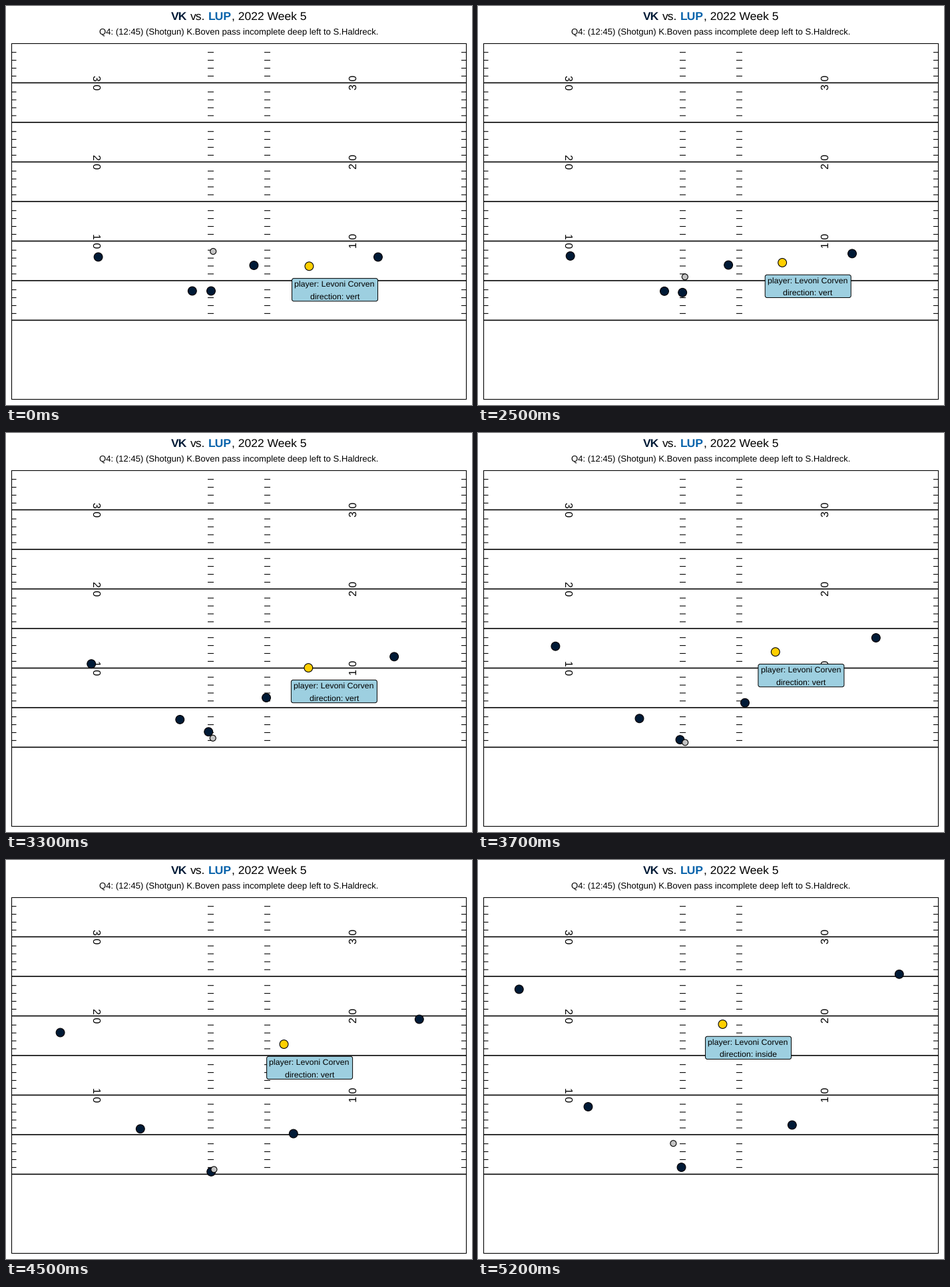
A matplotlib script that plays this animation: 700 px wide and 600 px high, repeating every 7.3 s.

```python
import numpy as np
import matplotlib.pyplot as plt
from matplotlib.animation import FuncAnimation
from matplotlib.patches import Circle, FancyBboxPatch, Rectangle

plt.rcParams.update({"font.family": "Liberation Sans",
                     "text.hinting": "none", "path.snap": False})

W, H, DPI = 700, 600, 100
PX = 72 / DPI
NAVY, BLUE, GOLD = "#001a36", "#0863ab", "#ffcf00"
SKY, GREY = "#9dcfe0", "#c3c3c3"

LEFT, RIGHT, TOP, BOTTOM = 8.5, 691.5, 56.5, 591.5
GOAL, YARD = 472.5, 11.9        # y of the lowest yard line, pixels per yard
FRAMES, INTERVAL = 73, 100
HOLD, STEPS = 20, 32            # opening pause and number of moves
BEAT = 8                        # steps between the points of a run
TURN = 27                       # step at which the route breaks inside

# One point per beat; the last lies one step past the final pose.
RUNS = [
    [(138.6, 377.4), (136, 367.3), (116.4, 320.7), (81.6, 259.5), (59, 185)],
    [(558.9, 377.5), (570, 358.5), (597.8, 308), (620.8, 239.5), (634.4, 162)],
    [(372.4, 390), (383.5, 391), (401, 405.7), (431.8, 411.5), (477.7, 396.5)],
    [(279.8, 428.5), (275.5, 429.3), (242.5, 429.3), (201.8, 404.3), (160.3, 366.2)],
    [(308, 428.5), (305.8, 437.3), (303.5, 461.2), (308.2, 468.8), (305.1, 461)],
]
TARGET = [(455.4, 391.3), (457.8, 372.8), (446.8, 329.2), (417.5, 277), (360.1, 242.8)]


def run(points, step):
    """Smooth cubic run that starts from rest."""
    p = np.array(points)
    slope = np.gradient(p, axis=0)
    slope[0] = 0
    t = max(step - 1, 0) / BEAT
    i = min(int(t), len(p) - 2)
    u = t - i
    ease = u * u * (3 - 2 * u)
    return (p[i] + (p[i + 1] - p[i]) * ease
            + u * (1 - u) * ((1 - u) * slope[i] - u * slope[i + 1]))


def ball_at(step):
    """Snap, short drop back, hold, throw."""
    keys = [1, 9, 15, 29, 32]
    return (np.interp(step, keys, [311.2, 310.5, 310.9, 313, 293.4]),
            np.interp(step, keys, [369, 445.7, 465.4, 465.4, 426.2]))


fig = plt.figure(figsize=(W / DPI, H / DPI), dpi=DPI, facecolor="white")
ax = fig.add_axes([0, 0, 1, 1])
ax.set(xlim=(0, W), ylim=(H, 0))
ax.axis("off")


def label(x, y, text, size, **kw):
    kw = {"ha": "center", "va": "baseline", "color": "black", **kw}
    return ax.text(x, y, text, fontsize=size * PX, **kw)


def dot(radius, color, z):
    return ax.add_patch(Circle((0, 0), radius, fc=color, ec="black",
                               lw=1.1 * PX, zorder=z))


def draw_titles():
    for x, text, color, weight in [(248, "VK", NAVY, "bold"),
                                   (277, "vs.", "black", "normal"),
                                   (304, "LUP", BLUE, "bold"),
                                   (339, ", 2022 Week 5", "black", "normal")]:
        label(x, 21, text, 17.5, ha="left", color=color, weight=weight)
    label(350, 43, "Q4: (12:45) (Shotgun) K.Boven pass incomplete deep left "
                   "to S.Haldreck.", 13.13)


def draw_field():
    ax.add_patch(Rectangle((LEFT, TOP), RIGHT - LEFT, BOTTOM - TOP, fill=False,
                           ec="black", lw=1.1 * PX, zorder=1))
    ax.hlines([GOAL - y * YARD for y in range(0, 35, 5)], LEFT, RIGHT,
              color="black", lw=1.6 * PX, zorder=1)
    marks = [GOAL + 1.8 - y * YARD for y in range(1, 35) if y % 5]
    for x0, x1 in [(LEFT, 15.5), (303, 312), (388, 397), (684, RIGHT)]:
        ax.hlines(marks, x0, x1, color="black", lw=1.1 * PX, zorder=1)
    for ten in (1, 2, 3):
        y = GOAL - 10 * ten * YARD - 0.6
        for x, angle in [(129.8, -90), (527, 90)]:
            label(x, y, f"{ten} 0", 16, rotation=angle,
                  rotation_mode="anchor", zorder=2)


draw_titles()
draw_field()

runners = [dot(6.4, NAVY, 3) for _ in RUNS]
target = dot(6.4, GOLD, 3)
ball = dot(4.5, GREY, 4)
tag = ax.add_patch(FancyBboxPatch((0, 0), 129, 34.3, fc=SKY, ec="black",
                                  boxstyle="round,pad=0,rounding_size=3",
                                  lw=1 * PX, zorder=5))
name = label(0, 0, "player: Levoni Corven", 12.44, zorder=6)
route = label(0, 0, "", 12.44, zorder=6)


def update(frame):
    step = min(max(frame - HOLD, 0), STEPS)
    for runner, points in zip(runners, RUNS):
        runner.center = run(points, step)
    x, y = target.center = run(TARGET, step)
    ball.center = ball_at(step)
    tag.set_x(x - 25.9)
    tag.set_y(y + 18.3)
    name.set_position((x + 38.2, y + 31.4))
    route.set_position((x + 38.4, y + 49.4))
    route.set_text("direction: " + ("vert" if step < TURN else "inside"))
    return [*runners, target, ball, tag, name, route]


anim = FuncAnimation(fig, update, frames=FRAMES, interval=INTERVAL,
                     repeat=True, repeat_delay=0)
plt.show()
```
